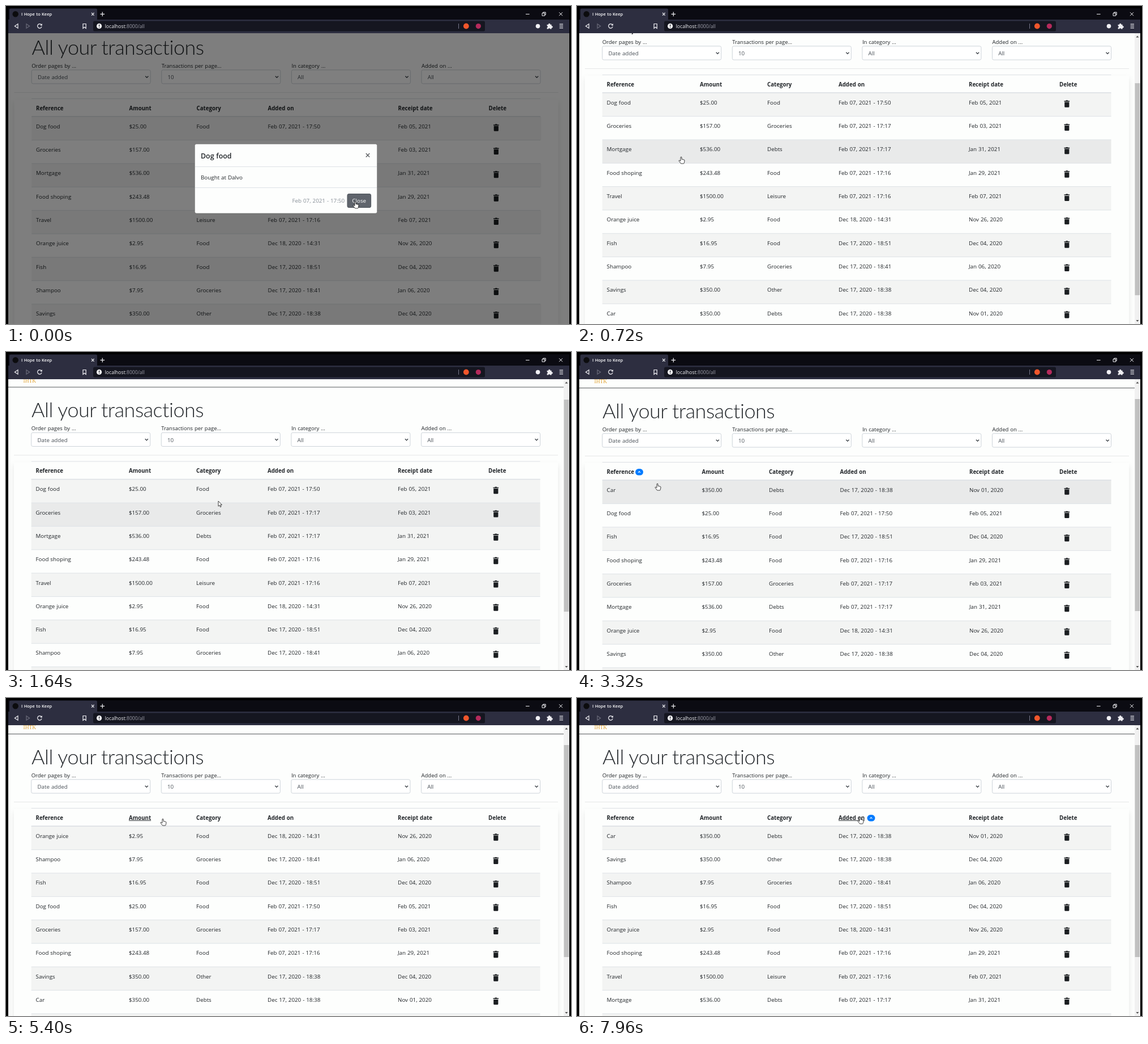
Write an HTML page that moves like this. It is 998 by 561 pixels and loops after 8 s.

```html
<!DOCTYPE html>
<html lang="en">
<head>
<meta charset="utf-8">
<title>All your transactions</title>
<style>
  html, body { margin: 0; width: 100%; height: 100%; overflow: hidden; background: #000; }
  svg { display: block; width: 998px; height: 561px; }
  text { font: 9.8px "Open Sans", "Noto Sans", sans-serif; word-spacing: .4px; fill: #212529; white-space: pre; }
  .bold { font-weight: 700; font-size: 9.7px; }
  .label { font-size: 9.5px; }
  .title { font: 300 36px Lato, "Open Sans", sans-serif; letter-spacing: -.5px; word-spacing: 0; }
  .brand { font: 9.5px "Liberation Serif", serif; fill: #e0a030; }
  .value { fill: #495057; }
  .tab { font-size: 7.5px; font-weight: 600; fill: #fff; }
  .url { font-size: 8.6px; fill: #f2f2f5; }
  .dim { fill: #9c9da8; }
  .heading { font-size: 12.4px; font-weight: 600; }
  .muted { fill: #868e96; }
  .card { filter: drop-shadow(0 5px 5px rgba(0, 0, 0, .09)); }
  .line { stroke: #dee2e6; fill: none; }
  .icon { stroke: #f0f0f4; fill: none; stroke-width: 1.2; }
</style>
</head>
<body>
<svg id="stage" viewBox="0 0 998 561"></svg>
<script>
const LOOP = 8000, STEP = 40;
const ROW_TOP = 226.3, ROW_H = 41.33;
const COLUMNS = ["Reference", "Amount", "Category", "Added on", "Receipt date", "Delete"];
const TEXT_X = [52.5, 217, 336, 462, 692, 852];
const BADGE_X = [103, 260, 383.5, 512.5];
const BADGE_SHIFT = [0, 3.5, 3, 2.5, 1, 0];

const rows = `Dog food|$25.00|Food|Feb 07, 2021 - 17:50|Feb 05, 2021
Groceries|$157.00|Groceries|Feb 07, 2021 - 17:17|Feb 03, 2021
Mortgage|$536.00|Debts|Feb 07, 2021 - 17:17|Jan 31, 2021
Food shoping|$243.48|Food|Feb 07, 2021 - 17:16|Jan 29, 2021
Travel|$1500.00|Leisure|Feb 07, 2021 - 17:16|Feb 07, 2021
Orange juice|$2.95|Food|Dec 18, 2020 - 14:31|Nov 26, 2020
Fish|$16.95|Food|Dec 17, 2020 - 18:51|Dec 04, 2020
Shampoo|$7.95|Groceries|Dec 17, 2020 - 18:41|Jan 06, 2020
Savings|$350.00|Other|Dec 17, 2020 - 18:38|Dec 04, 2020
Car|$350.00|Debts|Dec 17, 2020 - 18:38|Nov 01, 2020`.split("\n").map(line => line.split("|"));

// Sorting is stable, so every click works on the order left by the one before.
const sortKey = [
  v => v,
  v => +v.slice(1),
  v => v,
  v => Date.parse(v.replace(" -", ""))
];
const clicks = [
  { at: 0 },
  { at: 2440, column: 0, dir: 1, badge: true },
  { at: 3760, column: 0, dir: -1, badge: true },
  { at: 4600, column: 1, dir: 1, badge: true },
  { at: 5240, column: 1, dir: 1 },
  { at: 6200, column: 2, dir: 1, badge: true },
  { at: 7640, column: 3, dir: 1, badge: true }
];
let order = rows.map((_, i) => i);
for (const click of clicks) {
  const { column, dir } = click;
  if (column !== undefined) {
    const key = i => sortKey[column](rows[i][column]);
    order = [...order].sort((a, b) => dir * (key(a) > key(b) ? 1 : key(a) < key(b) ? -1 : 0));
  }
  click.order = order;
}

// Each entry: time, then values.
const scrollPath = [[0, -31], [640, -31], [720, -73], [840, -95], [1280, -95], [1640, -1.5], [1720, 0]];
const cursorPath = [
  [0, 617, 345], [160, 617, 345], [440, 181.5, 269], [560, 182, 268], [720, 184, 266], [1240, 190, 266],
  [1640, 375, 263], [2280, 92, 210], [2640, 92, 210], [3320, 142, 232], [3640, 88, 211], [3840, 88, 211],
  [4440, 240, 211], [5000, 240, 211], [5400, 277, 213], [6040, 362, 211], [6600, 362, 211],
  [7400, 497, 209], [7960, 500, 210]
];
const cursorKinds = [[0, "hand"], [200, "arrow"], [600, "hand"], [920, "arrow"], [1760, "hand"]];

const clamp = v => Math.min(1, Math.max(0, v));
const ramp = (t, start, length) => clamp((t - start) / length);
const smooth = p => p * p * (3 - 2 * p);
const latest = (list, t, time) => list.filter(item => time(item) <= t).pop();

function along(path, t, ease = p => p) {
  const i = path.findIndex(point => point[0] > t);
  if (i < 0) return path[path.length - 1].slice(1);
  const [a, b] = [path[i - 1], path[i]];
  const p = ease((t - a[0]) / (b[0] - a[0]));
  return a.slice(1).map((v, k) => v + (b[k + 1] - v) * p);
}

const text = (x, y, content, cls = "", extra = "") =>
  `<text x="${x}" y="${y}" class="${cls}" ${extra}>${content}</text>`;
const rect = (x, y, w, h, fill, extra = "") =>
  `<rect x="${x}" y="${y}" width="${w}" height="${h}" fill="${fill}" ${extra}/>`;
const path = (d, extra = "") => `<path d="${d}" ${extra}/>`;
const dot = (x, y, r, fill) => `<circle cx="${x}" cy="${y}" r="${r}" fill="${fill}"/>`;

const field = ([label, value], i) => {
  const x = 44.7 + 229.6 * i;
  return text(x, 139.8, label, "label") +
    rect(x, 143.8, 210, 24.2, "#fff", 'rx="2.6" stroke="#ced4da"') +
    text(x + 10.7, 160.4, value, "value") +
    path(`M${x + 201} 154.8l2.6 2.6 2.6-2.6`, 'fill="none" stroke="#343a40" stroke-width="1.3"');
};

const trash = path(
  "M860.5 240.2h2.7l.7-.9h2.8l.7.9h2.7v1.6h-9.6zM861.2 242.6h8.2v7.8q0 1.3-1.3 1.3h-5.6q-1.3 0-1.3-1.3z",
  'fill="#1b1e21"');

const rowGroup = cells => `<g class="row">` +
  cells.map((cell, c) => text(TEXT_X[c], 246.7, cell, "cell", `data-col="${c}"`)).join("") + trash + `</g>`;

const page = `
  ${rect(4, 48, 991, 513, "#fdfefd")}
  <g id="content">
    ${text(30.5, 55, "IHTK", "brand")}
    <path id="navline" d="M4 63.5H985" stroke="#55585b"/>
    ${text(45, 116.5, "All your transactions", "title")}
    ${[["Order pages by ...", "Date added"], ["Transactions per page...", "10"],
       ["In category ...", "All"], ["Added on ...", "All"]].map(field).join("")}
    ${path("M14 183.5H975", 'stroke="#e6e7e7"')}
    ${rect(14, 196, 961, 500, "#fdfefd", 'class="card"')}
    ${rows.map((_, i) => rect(44.7, ROW_TOP + i * ROW_H, 898.8, ROW_H, "none", 'class="stripe"')).join("")}
    ${path("M44.7 194.5H943.5", 'class="line"')}
    ${rows.map((_, i) => path(`M44.7 ${ROW_TOP + i * ROW_H}H943.5`, 'class="line"')).join("")}
    ${path("M44.7 226H943.5", 'class="line" stroke-width="1.3"')}
    ${COLUMNS.map((name, c) => text(TEXT_X[c], 214.7, name, "bold cell head", `data-col="${c}"`)).join("")}
    ${rows.map(rowGroup).join("")}
    <g id="badge">${rect(0, 206, 14, 11.6, "#007bff", 'rx="5.8"')}
      <path id="chevron" fill="none" stroke="#fff" stroke-width="1.1"/></g>
  </g>
  <g id="scrollbar">
    ${rect(985, 48, 10, 513, "#f1f1f1")}
    ${path("M987.4 55.6h5l-2.5-3zM987.4 554h5l-2.5 3z", 'fill="#505050"')}
    ${rect(985.5, 83, 9, 374, "#c1c1c1", 'id="thumb"')}
  </g>
  ${rect(4, 48, 991, 513, "#000", 'id="backdrop"')}
  <g id="modal">
    ${rect(333.5, 243.5, 322, 122.3, "#fdfefd", 'rx="3" stroke="#000" stroke-opacity=".2"')}
    ${path("M334 283.5H655M334 320.5H655", 'class="line"')}
    ${text(344, 268.8, "Dog food", "heading")}
    ${path("M635.8 260l6.4 6.4m0-6.4l-6.4 6.4", 'stroke="#5c5f62" stroke-width="1.4"')}
    ${text(344, 306, "Bought at Dalvo")}
    ${text(598, 347.3, "Feb 07, 2021 - 17:50", "muted", 'text-anchor="end"')}
    ${rect(603, 331.5, 41.6, 24, "#5f646c", 'rx="2.6" stroke="#4e545b"')}
    ${text(623.7, 347.3, "Close", "", 'text-anchor="middle" style="fill:#fff"')}
  </g>`;

const browser = `
  ${rect(0, 0, 998, 48, "#000")}
  ${rect(4, 4, 991, 20, "#0b0b12")}
  ${path("M6 24V7q0-2.5 2.5-2.5h150q2.5 0 2.5 2.5v17z", 'fill="#2d2e40"')}
  ${rect(4, 24, 991, 24, "#2d2e40")}
  ${dot(16.7, 14.3, 5.2, "#0c0c0e")}
  ${text(27, 17.2, "I Hope to Keep", "tab")}
  ${path("M151 12l4.6 4.6m0-4.6l-4.6 4.6M166.5 14.4h7.6m-3.8-3.8v7.6", 'class="icon" stroke-width="1.4"')}
  ${path("M918 14.4h6.6M977 11.2l6 6m0-6l-6 6M947 12.6h4.6v4.6h-4.6zM948.6 12.4v-1.4h4.6v4.6h-1.4", 'class="icon" style="stroke-width:1"')}
  ${path("M21 31.6v7.6l-5.6-3.8z", 'class="icon"')}
  ${path("M36 31.6v7.6l5.6-3.8z", 'class="icon" style="stroke:#6a6b7a"')}
  ${path("M62.6 33.2a3.8 3.8 0 1 0 .5 3.2", 'class="icon"')}
  ${path("M63.8 31v3.4h-3.4z", 'fill="#f0f0f4"')}
  ${path("M136 31.5h5.2v8l-2.6-2.2-2.6 2.2z", 'class="icon"')}
  ${rect(154, 26.5, 692, 18, "#151620", 'rx="2.5"')}
  ${dot(164.6, 35.4, 4.6, "#f4f4f6")}
  ${path("M164.6 32.6v3.4m0 1v1.3", 'stroke="#151620" stroke-width="1.2"')}
  ${text(174.7, 38.6, 'localhost<tspan class="dim">:8000/all</tspan>', "url")}
  ${path("M799.5 31v9", 'stroke="#77788a"')}
  ${dot(812.8, 35.5, 4.9, "#f0562b")}
  ${dot(834.3, 35.6, 4.6, "#b52a5c")}
  ${dot(939.5, 35.6, 3.8, "#f0f0f4")}
  ${path("M955.6 32.8h2.6a1.6 1.6 0 1 1 3 0h2.4v2.6a1.6 1.6 0 1 1 0 3v2.2h-2.6a1.4 1.4 0 0 0-2.8 0h-2.6v-2.6a1.4 1.4 0 0 0 0-2.8z", 'fill="#f0f0f4"')}
  ${path("M977.6 32.2h6.4m-6.4 3.2h6.4m-6.4 3.2h6.4", 'class="icon"')}
  ${rect(0, 48, 4, 513, "#000")}${rect(995, 48, 3, 513, "#000")}`;

const cursors = `
  <g id="cursor" fill="#fff" stroke="#111" stroke-width=".8" stroke-linejoin="round">
    ${path("M0 0v9.2l2.1-1.9 1.5 3.3 1.5-.7-1.4-3.2h2.8z", 'id="arrow"')}
    ${path("M-1 .8q1-1.5 2 0v3.5l4 .9q1.2.4 1 1.8l-.6 3.4-.8 1.6h-5l-3.4-4.4q-.6-1.6 1-1.3l1.8 1.2z", 'id="hand"')}
  </g>`;

const stage = document.getElementById("stage");
stage.innerHTML = page + browser + cursors;

const $ = id => document.getElementById(id);
const all = selector => [...stage.querySelectorAll(selector)];
const rowNodes = all(".row"), stripes = all(".stripe"), cells = all(".cell"), heads = all(".head");
const set = (node, name, value) => node.setAttribute(name, value);
const show = (node, on) => { node.style.display = on ? "" : "none"; };

function render(t) {
  const locked = t < 520;
  const [scroll] = along(scrollPath, t);
  const [x, y] = along(cursorPath, t, smooth);
  const state = latest(clicks, t, click => click.at);

  set($("content"), "transform", `translate(${locked ? .5 : 0} ${scroll})`);
  set($("navline"), "d", `M4 63.5H${locked ? 995 : 985}`);
  show($("scrollbar"), !locked);
  set($("thumb"), "y", 83 - scroll / 1.372);

  const slide = ramp(t, 160, 300);
  set($("modal"), "transform", `translate(0 ${-32 * (1 - (1 - slide) ** 2)})`);
  set($("modal"), "opacity", 1 - ramp(t, 160, 150));
  set($("backdrop"), "opacity", .5 * (1 - ramp(t, 360, 150)));

  state.order.forEach((row, place) => set(rowNodes[row], "transform", `translate(0 ${place * ROW_H})`));

  // Hover follows scrolling one step late.
  const [hoverScroll] = along(scrollPath, Math.max(0, t - STEP));
  const hoverY = y - hoverScroll;
  const hoverRow = locked ? -1 : Math.floor((hoverY - ROW_TOP) / ROW_H);
  stripes.forEach((stripe, i) => {
    set(stripe, "fill", i === hoverRow ? "#e9eaea" : i % 2 ? "none" : "#f3f4f3");
    set(stripe, "width", locked ? 900 : 898.8);
  });

  const shifted = state.badge && state.column === 0;
  cells.forEach(cell => {
    const c = +cell.dataset.col;
    set(cell, "x", TEXT_X[c] + (shifted ? BADGE_SHIFT[c] : 0));
  });

  const onHeader = !locked && hoverY > 194 && hoverY < 226;
  heads.forEach((head, c) => {
    const hovered = onHeader && x > TEXT_X[c] - 7.5 && x < (TEXT_X[c + 1] || 951) - 7.5;
    set(head, "text-decoration", hovered ? "underline" : "none");
  });

  show($("badge"), state.badge);
  if (state.badge) {
    set($("badge"), "transform", `translate(${BADGE_X[state.column]} 0)`);
    set($("chevron"), "d", state.dir > 0 ? "M5 213l2-2.4 2 2.4" : "M5 210.6l2 2.4 2-2.4");
  }

  const [, kind] = latest(cursorKinds, t, item => item[0]);
  set($("cursor"), "transform", `translate(${x} ${y})`);
  show($("arrow"), kind === "arrow");
  show($("hand"), kind === "hand");
}

const start = performance.now();
function tick() {
  const t = (performance.now() - start) % LOOP;
  render(Math.floor(t / STEP) * STEP);
  requestAnimationFrame(tick);
}
tick();
</script>
</body>
</html>
```
